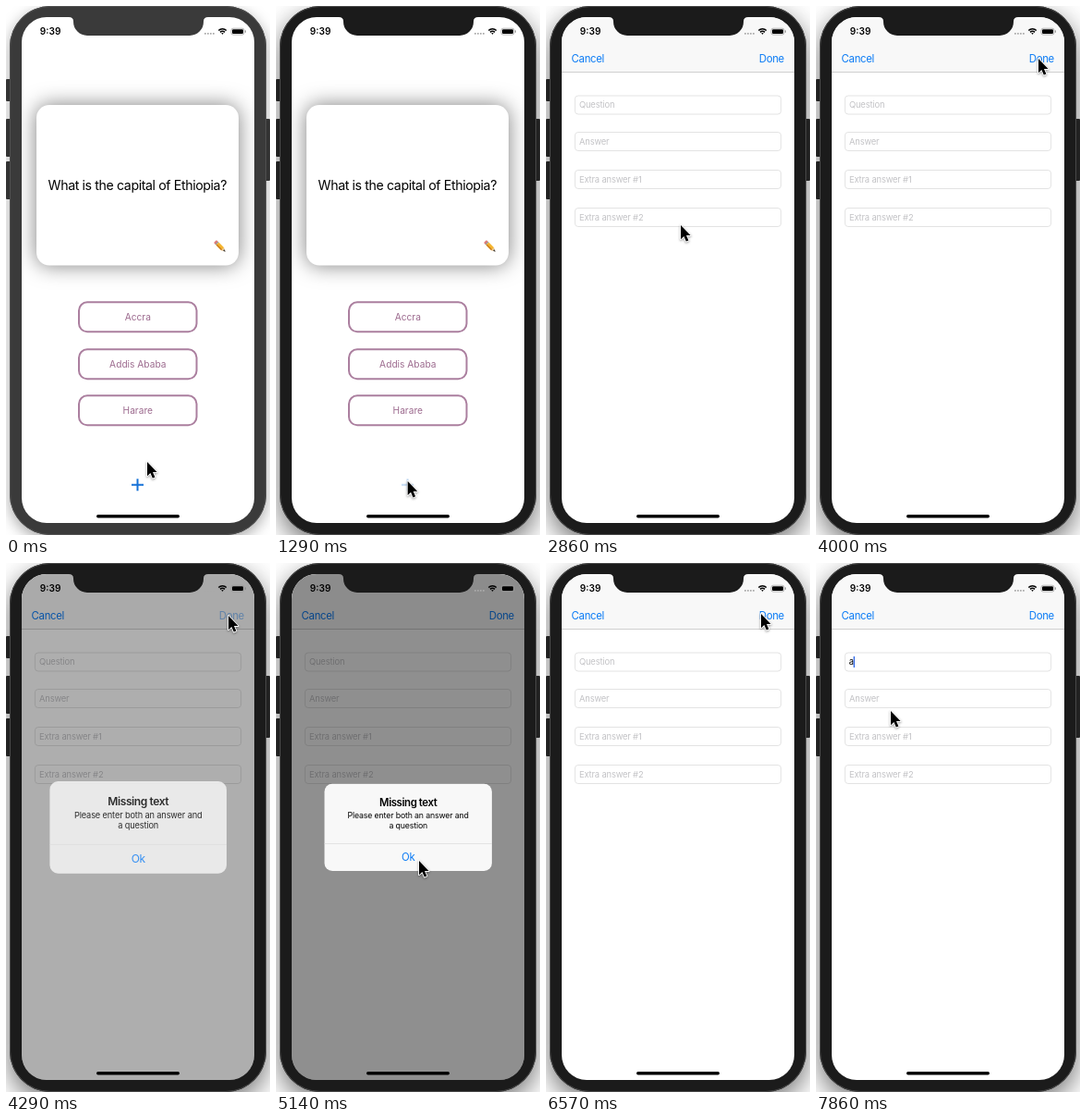
An HTML page with a canvas for the animation above (8000 ms loop, 286 px wide and 572 px high).

```html
<!DOCTYPE html>
<html lang="en">
<head>
<meta charset="utf-8">
<title>Flashcards demo</title>
<style>
html, body { margin: 0; width: 100%; height: 100%; overflow: hidden; background: #fff; }
canvas { display: block; width: 286px; height: 572px; }
</style>
</head>
<body>
<canvas id="stage"></canvas>
<script>
const W = 286, H = 572, LOOP = 8000, FPS = 7;
const BLUE = '#0b7bf5', MAUVE = '#ab7f9f';
const canvas = document.getElementById('stage');
const ctx = canvas.getContext('2d');
const ratio = window.devicePixelRatio || 1;
canvas.width = W * ratio;
canvas.height = H * ratio;

// Pointer tip: [step, x, y]
const pointerPath = [
  [0, 153, 493], [1, 180, 400], [2, 221, 262], [3, 170, 430], [4, 135, 514],
  [7, 135, 514], [8, 143, 514], [14, 141, 513], [17, 63, 330], [20, 146, 237],
  [22, 233, 55], [24, 238, 60], [28, 241, 57], [32, 241, 57], [34, 190, 230],
  [36, 155, 322], [37, 156, 320], [38, 162, 286], [42, 110, 112], [46, 233, 55],
  [50, 71, 109], [52, 71, 109], [53, 73, 118], [55, 81, 160], [56, 81, 160]
];
const sheetPath = [[9, 1], [10, 0.6], [11, 0.12], [12, 0.02], [13, 0]];
const alertPath = [[28, 0], [29, 0.2], [30, 0.72], [31, 0.95], [32, 1], [36, 1], [37, 0.55], [38, 0.07], [39, 0]];

function sample(path, step) {
  const next = path.findIndex(p => p[0] >= step);
  if (next < 0) return path[path.length - 1].slice(1);
  if (next === 0) return path[0].slice(1);
  const a = path[next - 1], b = path[next];
  const u = (step - a[0]) / (b[0] - a[0]);
  return a.slice(1).map((v, i) => v + (b[i + 1] - v) * u);
}

function box(x, y, w, h, r, fill, stroke, line = 1) {
  ctx.beginPath();
  ctx.roundRect(x, y, w, h, r);
  if (fill) { ctx.fillStyle = fill; ctx.fill(); }
  if (stroke) { ctx.strokeStyle = stroke; ctx.lineWidth = line; ctx.stroke(); }
}

function text(str, x, y, size, color, { align = 'left', weight = 400, track = 0 } = {}) {
  ctx.font = `${weight} ${size}px Inter, "Liberation Sans", sans-serif`;
  ctx.letterSpacing = `${size * track}px`;
  ctx.textAlign = align;
  ctx.fillStyle = color;
  ctx.fillText(str, x, y);
}

function line(points, color, width) {
  ctx.beginPath();
  points.forEach(([x, y], i) => i ? ctx.lineTo(x, y) : ctx.moveTo(x, y));
  ctx.strokeStyle = color;
  ctx.lineWidth = width;
  ctx.stroke();
}

function shadow(color, blur, dy = 0) {
  ctx.shadowColor = color;
  ctx.shadowBlur = blur * ratio;
  ctx.shadowOffsetY = dy * ratio;
}

function drawDevice(active) {
  ctx.fillStyle = '#fff';
  ctx.fillRect(0, 0, W, H);
  const body = active ? '#1b1b1b' : '#3a3a3a';
  ctx.save();
  if (active) shadow('rgba(0,0,0,.55)', 28, 10);
  else shadow('rgba(0,0,0,.35)', 16, 5);
  box(4, 0, 278, 572, 44, body);
  ctx.restore();
  [[0, 79, 24], [0, 122, 41], [0, 168, 41], [281, 122, 67]].forEach(
    ([x, y, h]) => box(x, y, 5, h, 1, active ? '#222' : '#333'));
  box(4.5, 0.5, 277, 571, 43.5, body, active ? '#484848' : '#505050');
}

function drawNotch(active) {
  ctx.beginPath();
  ctx.moveTo(68, 11);
  ctx.lineTo(68, 12);
  ctx.quadraticCurveTo(73, 12, 73, 16.5);
  ctx.arcTo(73, 32, 88, 32, 15);
  ctx.arcTo(214, 32, 214, 17, 15);
  ctx.lineTo(214, 16.5);
  ctx.quadraticCurveTo(214, 12, 219, 12);
  ctx.lineTo(219, 11);
  ctx.fillStyle = active ? '#1b1b1b' : '#3a3a3a';
  ctx.fill();
}

function drawPencil() {
  ctx.save();
  ctx.translate(226.5, 254.5);
  ctx.rotate(Math.PI / 4);
  box(0, -2.1, 3, 4.2, 1, '#df7a78');
  ctx.fillStyle = '#9a9a9a';
  ctx.fillRect(2.2, -2.1, 1.4, 4.2);
  ctx.fillStyle = '#f5b52e';
  ctx.fillRect(3.6, -2.1, 8, 4.2);
  ctx.fillStyle = '#c87b1c';
  ctx.fillRect(3.6, 0.7, 8, 1.4);
  ctx.fillStyle = '#e5c08c';
  ctx.beginPath();
  ctx.moveTo(11.6, -2.1); ctx.lineTo(15.5, 0); ctx.lineTo(11.6, 2.1);
  ctx.fill();
  ctx.fillStyle = '#333';
  ctx.beginPath();
  ctx.moveTo(13.4, -1.2); ctx.lineTo(15.8, 0); ctx.lineTo(13.4, 1.2);
  ctx.fill();
  ctx.restore();
}

function drawCard(plusPressed) {
  ctx.fillStyle = '#fff';
  ctx.fillRect(17, 12, 252, 547);
  ctx.save();
  shadow('rgba(0,0,0,.5)', 22);
  box(33, 107, 219, 173.5, 14, '#fff');
  ctx.restore();
  text('What is the capital of Ethiopia?', 142.3, 199, 14.2, '#000', { align: 'center', track: -0.028 });
  drawPencil();
  [['Accra', 320], ['Addis Ababa', 371], ['Harare', 421]].forEach(([label, y]) => {
    box(79, y + 0.3, 127.5, 32, 9, null, MAUVE, 2);
    text(label, 142.8, y + 20, 10.2, '#9c6a8e', { align: 'center' });
  });
  ctx.globalAlpha = plusPressed ? 0.25 : 1;
  line([[136, 517.7], [149, 517.7]], '#1672d8', 2);
  line([[142.5, 511.2], [142.5, 524.2]], '#1672d8', 2);
  ctx.globalAlpha = 1;
}

function drawForm(step) {
  ctx.fillStyle = '#fff';
  ctx.fillRect(17, 12, 252, 547);
  ctx.fillStyle = '#f8f8f8';
  ctx.fillRect(17, 12, 252, 59);
  ctx.fillStyle = '#c4c4c4';
  ctx.fillRect(17, 71, 252, 0.8);
  text('Cancel', 27.6, 60.7, 11.4, BLUE, { track: -0.03 });
  ctx.globalAlpha = step === 29 || step === 30 ? 0.45 : 1;
  text('Done', 230.8, 60.7, 11.4, BLUE, { track: -0.03 });
  ctx.globalAlpha = 1;

  const typed = step >= 54;
  ['Question', 'Answer', 'Extra answer #1', 'Extra answer #2'].forEach((label, i) => {
    const y = 97 + [0, 39.5, 80.5, 121.5][i];
    box(31.4, y, 223.2, 20, 3.5, '#fff', '#dcdcdc', 0.8);
    if (i || !typed) text(label, 36, y + 13.2, 9.4, '#c3c3c6', { track: -0.018 });
  });
  if (typed) text('a', 35.8, 110.2, 9.4, '#000');
  if (step >= 52) {
    ctx.fillStyle = '#3a6fe8';
    ctx.fillRect(typed ? 40.6 : 35.6, 101, 1.4, 12);
  }
}

function drawAlert(step) {
  const [shown] = sample(alertPath, step);
  if (!shown) return;
  ctx.fillStyle = `rgba(0,0,0,${0.44 * shown})`;
  ctx.fillRect(17, 12, 252, 547);
  ctx.save();
  const scale = step < 34 ? 1 + 0.2 * (1 - shown) : 1;
  ctx.translate(143.2, 286);
  ctx.scale(scale, scale);
  ctx.globalAlpha = Math.min(1, shown * 1.12);
  box(-90.7, -47.3, 181.4, 94.3, 8.5, '#f8f8f8');
  ctx.fillStyle = '#dadada';
  ctx.fillRect(-90.7, 17, 181.4, 0.7);
  const center = { align: 'center', track: -0.015 };
  text('Missing text', 0, -23.2, 11.4, '#000', { align: 'center', weight: 600, track: -0.035 });
  text('Please enter both an answer and', 0, -9.8, 8.74, '#000', center);
  text('a question', 0, 1.2, 8.74, '#000', center);
  text('Ok', 0, 36.3, 11.4, BLUE, { align: 'center', track: -0.03 });
  ctx.restore();
}

function drawStatus() {
  text('9:39', 36.8, 31.2, 10.1, '#000', { weight: 600 });
  ctx.fillStyle = '#aaa';
  for (let i = 0; i < 4; i++) ctx.fillRect(215 + i * 3, 29, 1.7, 1.7);
  ctx.strokeStyle = '#000';
  ctx.lineWidth = 1.6;
  [1, 3.5, 6].forEach(r => {
    ctx.beginPath();
    ctx.arc(234.5, 30.8, r, -Math.PI * 0.75, -Math.PI * 0.25);
    ctx.stroke();
  });
  box(244, 24.2, 14, 6.8, 2, null, '#999', 0.7);
  box(245, 25.2, 12, 4.8, 1.2, '#000');
  box(258.8, 26.3, 1, 2.5, 0.5, '#888');
}

function drawPointer(x, y) {
  ctx.save();
  ctx.translate(x, y);
  ctx.beginPath();
  [[0, 0], [0, 15.2], [3.4, 12], [5.8, 17.6], [8.4, 16.5], [6, 11], [10.6, 11]].forEach(
    ([px, py], i) => i ? ctx.lineTo(px, py) : ctx.moveTo(px, py));
  ctx.closePath();
  ctx.lineJoin = 'round';
  ctx.lineWidth = 1.8;
  ctx.strokeStyle = '#fff';
  shadow('rgba(0,0,0,.4)', 2.5, 1);
  ctx.stroke();
  shadow('transparent', 0);
  ctx.fillStyle = '#000';
  ctx.fill();
  ctx.restore();
}

function draw(time) {
  const step = Math.floor((time + 4.5) * FPS / 1000) % (LOOP * FPS / 1000);
  const active = step >= 7;
  ctx.setTransform(ratio, 0, 0, ratio, 0, 0);
  drawDevice(active);

  ctx.save();
  ctx.beginPath();
  ctx.roundRect(17, 12, 252, 547, 27);
  ctx.clip();
  const [offset] = sample(sheetPath, step);
  if (offset > 0) drawCard(step === 8 || step === 9);
  if (offset < 1) {
    ctx.save();
    ctx.translate(0, offset * 547);
    drawForm(step);
    ctx.restore();
  }
  drawAlert(step);
  drawStatus();
  box(98, 550, 90, 3.4, 1.7, '#000');
  ctx.restore();

  drawNotch(active);
  drawPointer(...sample(pointerPath, step));
}

function tick() {
  draw(performance.now() % LOOP);
  requestAnimationFrame(tick);
}
tick();
</script>
</body>
</html>
```
